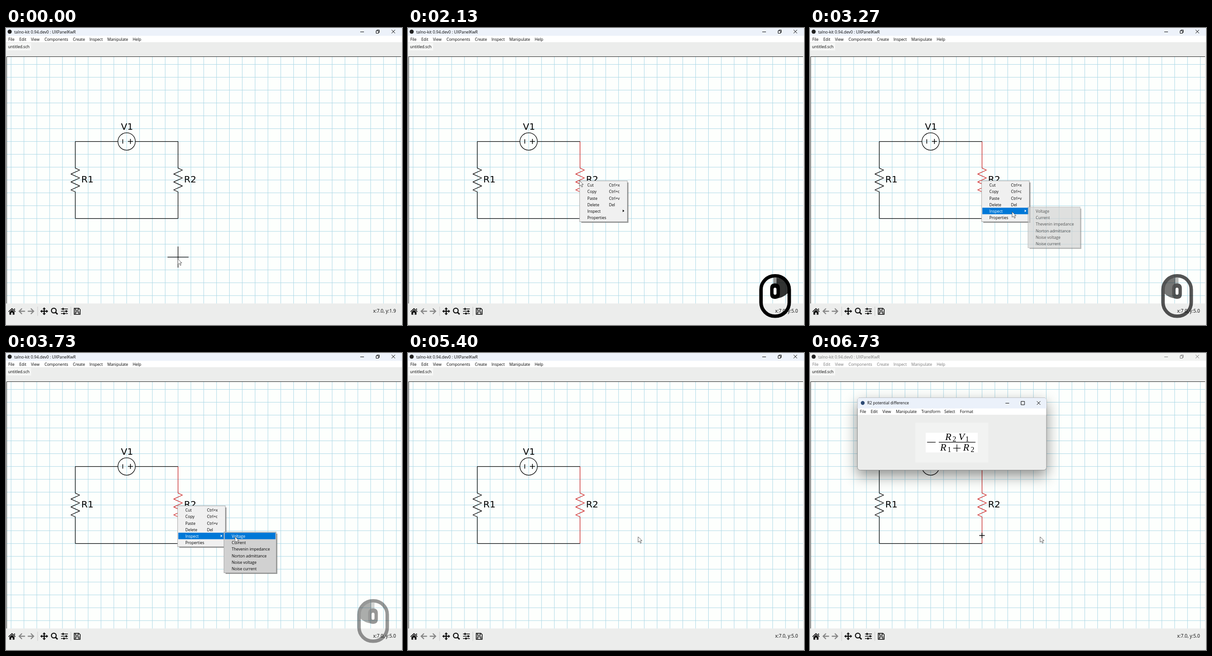
An HTML page for the animation above (7470 ms loop, 864 px wide and 648 px high).

```html
<!DOCTYPE html>
<html lang="en">
<head>
<meta charset="utf-8">
<title>Circuit editor</title>
<style>
html, body { margin: 0; width: 100%; height: 100%; overflow: hidden; background: #ecedec; }
svg { display: block; width: 100%; height: 100%; }
text { font-family: "Open Sans", "Noto Sans", sans-serif; font-size: 8.6px; white-space: pre; }
.label { font-family: "DejaVu Sans", sans-serif; font-size: 20px; }
.math { font-family: "Liberation Serif", serif; font-size: 22px; font-style: italic; }
.sub { font-family: "Liberation Serif", serif; font-size: 16px; }
.line { fill: none; stroke: #000; stroke-width: 1.25; stroke-linejoin: round; }
.thin { fill: none; stroke: currentColor; stroke-width: 1; }
</style>
</head>
<body>
<svg id="stage" viewBox="0 0 864 648" preserveAspectRatio="none"></svg>
<script>
const LOOP = 7470, TICK = 1000 / 15;
const ROW = 14.2, MENU_TOP = 335.3, SUB_TOP = 392.1, BASE = 10.8;
const STEP = 28.02, GRID_X = 11.1, GRID_Y = 79.5;
const BLUE = '#0078d7', RED = '#cb2222';

const rect = (x, y, w, h, fill, more = '') =>
  `<rect x="${x}" y="${y}" width="${w}" height="${h}" fill="${fill}" ${more}/>`;
const text = (x, y, s, more = '') => `<text x="${x}" y="${y}" ${more}>${s}</text>`;
const path = (d, more = 'class="line"') => `<path d="${d}" ${more}/>`;
const group = (id, body, more = '') => `<g id="${id}" ${more}>${body}</g>`;
const words = (y, list) => list.map(([x, s]) => text(x, y, s, 'fill="currentColor"')).join('');

function grid() {
  let d = '';
  for (let x = GRID_X; x < 862; x += STEP) d += `M${x} 63V601`;
  for (let y = GRID_Y; y < 601; y += STEP) d += `M2 ${y}H862`;
  return path(d, 'fill="none" stroke="#add8e6"');
}

function resistor(x) {
  const pitch = 8.65, top = 331.6 - 3 * pitch;
  let d = `M${x} 247.6V${top}`;
  for (let i = 0; i < 6; i++) d += `L${x + (i % 2 ? -9.5 : 9.5)} ${top + (i + .5) * pitch}`;
  return d + `L${x} ${top + 6 * pitch}V415.7`;
}

function frame() {
  return rect(0, 0, 864, 648, '#ecedec') +
    rect(0, 0, 864, 17, '#edf2fa', 'id="titlebar"') +
    rect(0, 17, 864, 14, '#fff') +
    rect(1, 33, 54, 16, '#f6f7f6') +
    text(4.5, 44.2, 'untitled.sch') +
    group('chrome',
      text(18, 11.7, 'talno-kit 0.94.dev0 : UXPanelKwR', 'fill="currentColor" style="font-size:8.8px"') +
      words(27.7, [[5, 'File'], [29, 'Edit'], [54.5, 'View'], [84, 'Components'], [146, 'Create'],
        [182, 'Inspect'], [221, 'Manipulate'], [276.5, 'Help']]) +
      path('M773 8.5H781M841.3 4L849 11.5M849 4L841.3 11.5M807.5 6H812.8V11.5H807.5ZM809.3 6V4.3H814.5V9.7H812.8', 'class="thin"')) +
    '<circle cx="8" cy="8" r="4.5" fill="#222"/>' +
    rect(0, 62, 862, 539, '#fdfffd') + grid() +
    path('M1.5 601V62.5H862', 'fill="none" stroke="#222"');
}

function toolbar() {
  return path('M13 611L21 618.6L20 619.8L13 613.4L6 619.8L5 618.6ZM17.5 612H19.5V616L17.5 614ZM7.5 619.8L13 614.8L18.5 619.8V625.5H14.6V621H11.4V625.5H7.5Z', 'fill="#111"') +
    path('M27 618L34 611.2L35.6 612.8L31.6 616.8H41.5V619.2H31.6L35.6 623.2L34 624.8ZM62 618L55 611.2L53.4 612.8L57.4 616.8H47.5V619.2H57.4L53.4 623.2L55 624.8Z', 'fill="#868686"') +
    path('M69 608V628M141.5 608V628', 'stroke="#c9c9c9" fill="none"') +
    path('M83.3 609.5L87 613.4H84.5V616.8H88V614.4L92 618L88 621.6V619.2H84.5V622.6H87L83.3 626.5L79.6 622.6H82.1V619.2H78.6V621.6L74.7 618L78.6 614.4V616.8H82.1V613.4H79.6Z', 'fill="#111"') +
    '<circle cx="104.3" cy="616.5" r="5.2" fill="none" stroke="#111" stroke-width="2.3"/>' +
    path('M108.3 620.5L112.6 624.8', 'stroke="#111" stroke-width="3" fill="none"') +
    path('M120 613H135M120 618H135M120 623H135', 'stroke="#111" stroke-width="1.6" fill="none"') +
    rect(123, 610.8, 3, 4.4, '#111') + rect(130, 615.8, 3, 4.4, '#111') + rect(125, 620.8, 3, 4.4, '#111') +
    path('M148.8 611.6H159L161.8 614.4V624.6H148.8ZM151.6 612V616H157.6V612M151.6 624V619.4H159V624', 'fill="none" stroke="#111" stroke-width="1.6"') +
    text(801, 621.3, '', 'id="coords" style="font-size:10.2px"');
}

function circuit() {
  return path('M151.2 247.6H244M282 247.6H375.4M151.2 415.7H375.4') +
    path(resistor(151.2)) + path(resistor(375.4), 'class="line" id="r2"') +
    '<circle cx="263.2" cy="247.6" r="19" class="line"/>' +
    path('M254.7 242.8V252.2M266 247.5H277M271.5 242V253', 'class="line" style="stroke-width:1.5"') +
    text(250.8, 222, 'V1', 'class="label"') +
    text(164.3, 336.8, 'R1', 'class="label"') + text(388.6, 336.8, 'R2', 'class="label"') +
    path('M369.3 398.2H381.3M375.3 392.2V404.2', 'class="line" id="plus" style="stroke-width:1.5"') +
    path('M-23 0H23M0 -23V23', 'class="line" id="cross"');
}

function panel(x, y, w, h, fill) {
  return rect(x + 4, y + 4, w - 2, h - 2, '#777', 'opacity=".75"') +
    rect(x + .5, y + .5, w - 1, h - 1, fill, 'stroke="#a6a6a6"');
}

function menus() {
  const items = [['Cut', 'Ctrl+x'], ['Copy', 'Ctrl+c'], ['Paste', 'Ctrl+v'], ['Delete', 'Del'], ['Inspect', ''], ['Properties', '']];
  const subs = ['Voltage', 'Current', 'Thevenin impedance', 'Norton admittance', 'Noise voltage', 'Noise current'];
  const main = items.map(([a, b], i) => {
    const y = MENU_TOP + BASE + i * ROW;
    const tip = b ? text(438.5, y, b) : '';
    const more = i === 4 ? path('M468.5 396.2L472 399L468.5 401.8Z', '') : '';
    return `<g class="item">${text(391.3, y, a)}${tip}${more}</g>`;
  }).join('');
  const list = subs.map((s, i) => text(492.5, SUB_TOP + BASE + i * ROW, s, 'class="choice"')).join('');
  return group('menu', panel(374, 333, 105, 90, '#f0f0f0') +
      rect(376, 0, 101, ROW, BLUE, 'id="bar"') + main) +
    group('submenu', panel(475, 390, 115, 90, '#d1d1d1') +
      rect(477, SUB_TOP, 111, ROW, BLUE, 'id="subbar"') + list) +
    group('flash', rect(477, SUB_TOP, 111, ROW, BLUE) +
      text(492.5, SUB_TOP + BASE, 'Voltage', 'fill="#fff"'));
}

function popup() {
  const sym = (x, y, s) => text(x, y, s, 'class="math"');
  const sub = (x, y, s) => text(x, y, s, 'class="sub"');
  const top = 'M103.5 121V103.5Q103.5 97.5 109.5 97.5H510Q516 97.5 516 103.5V121Z';
  return group('popup',
    rect(103.5, 97.5, 412.5, 158, '#ecedec', 'rx="6" stroke="#8f8f8f" style="filter:drop-shadow(0 12px 15px rgba(0,0,0,.44))"') +
    path(top, 'fill="#ebf1fa"') + rect(104, 121, 411.5, 13.7, '#fff') +
    '<circle cx="115" cy="109" r="4.2" fill="#2d4a74"/>' +
    text(125, 112.3, 'R2 potential difference') +
    path('M426.5 109.5H434.5M460.5 105.5H468V113H460.5ZM495 105.3L502.6 112.9M502.6 105.3L495 112.9', 'class="thin"') +
    words(131.2, [[108.7, 'File'], [132.5, 'Edit'], [158, 'View'], [187.5, 'Manipulate'],
      [243, 'Transform'], [293, 'Select'], [327, 'Format']]) +
    rect(230, 152, 159, 87, '#f2f3f2') + rect(252.5, 174, 113.5, 43, '#fff') +
    path('M255.5 194.5H274M281 194.5H361M312.5 207.5H328.5M320.5 199.5V215.5', 'class="line"') +
    sym(295, 190, 'R') + sub(311, 193, '2') + sym(324, 190, 'V') + sub(339, 193, '1') +
    sym(284, 213, 'R') + sub(300, 216, '1') + sym(334, 213, 'R') + sub(350.5, 216, '2'));
}

function mouse() {
  const button = path('M804 545C820 546 829 555 829 572V578Q818 589 804 590Z', 'opacity=".8"');
  return group('mouse',
    group('rightBtn', button) +
    group('leftBtn', button, 'transform="translate(1601 0) scale(-1 1)"') +
    rect(797, 545, 7, 14, '#000', 'opacity=".4"') +
    rect(770.2, 540.8, 61.6, 88, 'none', 'rx="30" stroke="#000" stroke-width="7.6"') +
    path('M800.7 557.3Q811.3 557.3 811.3 568V580.5Q811.3 591 800.7 591Q790.2 591 790.2 580.5V568Q790.2 557.3 800.7 557.3ZM800.7 566.5Q797.6 566.5 797.6 570V578.5Q797.6 582 800.7 582Q804 582 804 578.5V570Q804 566.5 800.7 566.5Z', 'fill-rule="evenodd"'));
}

const stage = document.getElementById('stage');
stage.innerHTML = frame() + toolbar() + circuit() + menus() + popup() +
  path('M0 0V12L2.9 9.4L5 14L7 13.1L5 8.6H8.7Z', 'id="cursor" fill="#fff" stroke="#4a4a4a" stroke-width=".9"') + mouse();

const el = {};
stage.querySelectorAll('[id]').forEach(n => el[n.id] = n);
const items = stage.querySelectorAll('.item'), choices = stage.querySelectorAll('.choice');

const clamp = v => Math.max(0, Math.min(1, v));
const smooth = p => p * p * (3 - 2 * p);
const easeOut = p => 1 - (1 - p) ** 3;
const fade = (node, a) => node.setAttribute('opacity', clamp(a));
const show = (node, on) => node.setAttribute('visibility', on ? 'visible' : 'hidden');
const move = (node, x, y) => node.setAttribute('transform', `translate(${x} ${y})`);

// Each move: first tick, last tick, end point, easing
const moves = [
  [1, 13, 374, 333, smooth],
  [35.7, 43, 441, 401, smooth],
  [50, 59, 502, 401, easeOut]
];
function pointer(k) {
  let x = 375, y = 504;
  for (const [a, b, tx, ty, ease] of moves) {
    const p = ease(clamp((k - a) / (b - a)));
    x += (tx - x) * p;
    y += (ty - y) * p;
  }
  return [x, y];
}

// Each click: tick before it fades in, tick when it is gone
const clicks = [[26, 39], [45, 58.4], [68, 81]];

function draw(ms) {
  const k = Math.floor((ms % LOOP + 3.4) / TICK);
  const [x, y] = pointer(k);
  move(el.cursor, x, y);

  const picked = k >= 28;
  show(el.cross, !picked);
  move(el.cross, 375.4, GRID_Y + STEP * Math.round((y - GRID_Y) / STEP));
  el.r2.style.stroke = picked ? RED : '#000';
  el.coords.textContent = 'x:7.0, y:' + (k < 27 ? 5 - (y - 331.5) / 56 : 5).toFixed(1);

  const open = k < 70;
  fade(el.menu, open ? (k - 28) / 3 : 0);
  fade(el.submenu, open ? (k - 47) / 3 : 0);
  const row = k >= 47 ? 4 : x >= 376 && y >= MENU_TOP ? Math.floor((y - MENU_TOP) / ROW) : -1;
  show(el.bar, row >= 0);
  el.bar.setAttribute('y', MENU_TOP + row * ROW);
  items.forEach((n, i) => n.setAttribute('fill', i === row ? '#fff' : '#000'));
  const inSub = k >= 48 && x >= 477;
  show(el.subbar, inSub);
  choices[0].setAttribute('fill', inSub ? '#fff' : '#000');
  fade(el.flash, open ? 0 : (73.5 - k) / 5);

  fade(el.mouse, Math.max(...clicks.map(([a, b]) => Math.min(k - a, b - k) / 6)));
  show(el.rightBtn, k < 42);
  show(el.leftBtn, k >= 42);

  const p = easeOut(clamp((k - 95) / 6)), s = .9 + .1 * p;
  fade(el.popup, (k - 95) / 4);
  el.popup.setAttribute('transform', `translate(${310 * (1 - s)} ${176.5 * (1 - s)}) scale(${s})`);
  const away = k >= 96;
  show(el.plus, away);
  el.titlebar.setAttribute('fill', away ? '#f2f3f2' : '#edf2fa');
  el.chrome.style.color = away ? '#777' : '#000';
}

const start = performance.now();
function loop() {
  draw(performance.now() - start);
  requestAnimationFrame(loop);
}
loop();
</script>
</body>
</html>
```
